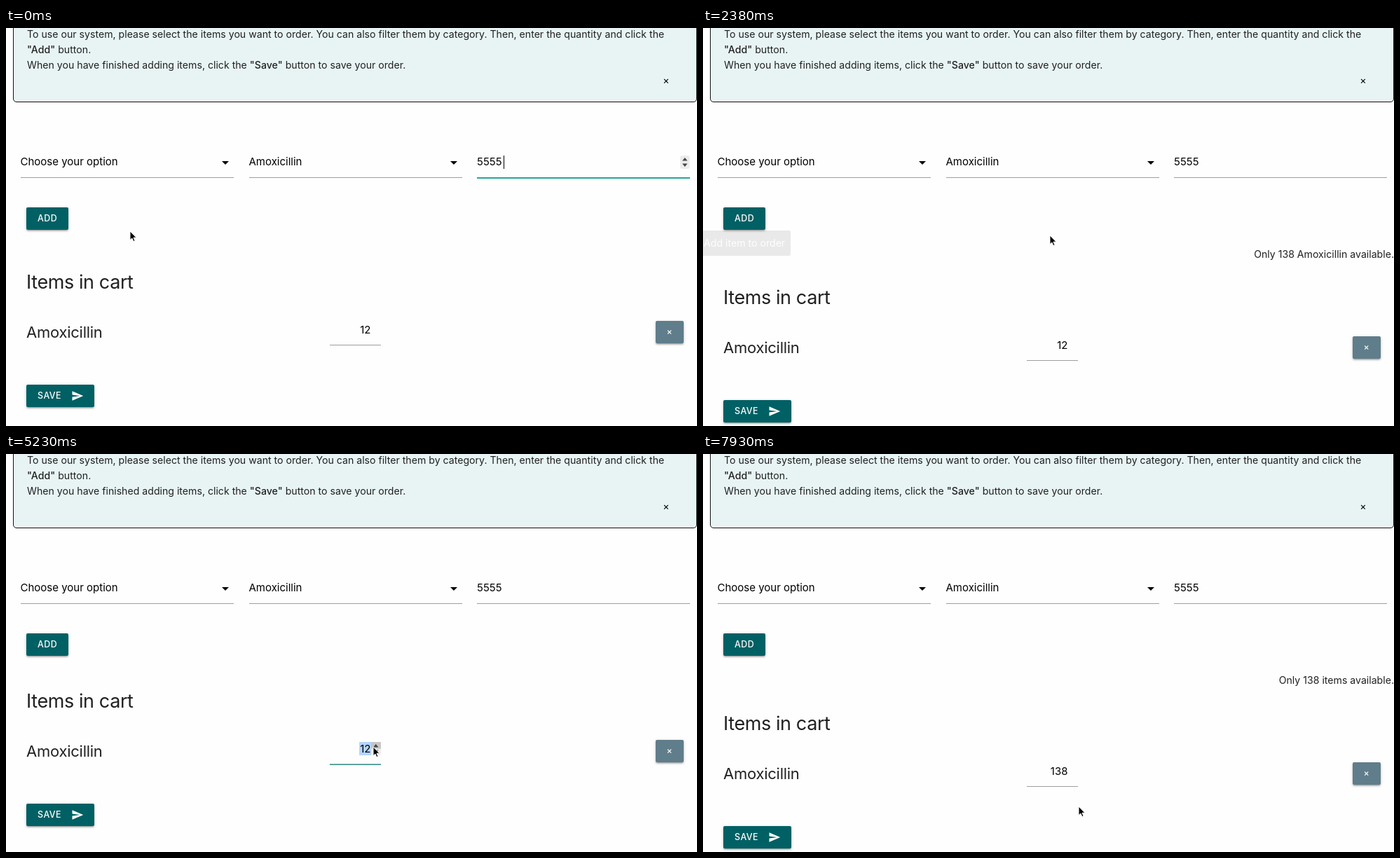
Write an HTML page that moves like this. It is 986 px wide and 568 px high and loops after 8000 ms.

```html
<!DOCTYPE html>
<html lang="en">
<head>
<meta charset="utf-8">
<title>Order form</title>
<style>
  html, body { margin: 0; width: 100%; height: 100%; overflow: hidden; background: #fefefe; }
  #stage { position: relative; width: 986px; height: 568px; overflow: hidden;
    font: 14.14px/20px Inter, sans-serif; font-optical-sizing: none; color: #212121; }
  #stage div, svg { position: absolute; white-space: pre; box-sizing: border-box; }
  b { font-weight: 500; }
  .field { top: 181px; width: 304px; height: 33px; border-bottom: 1px solid #9e9e9e; }
  .input { font-size: 15px; color: #000; }
  #stage .focus { border-color: #26a69a; box-shadow: 0 1px #26a69a; }
  .arrow { left: 287px; top: 9px; border: 5px solid transparent; border-top-color: #000; border-bottom: 0; }
  .caret { width: 1px; height: 19px; background: #000; }
  .btn { height: 32px; line-height: 32px; border-radius: 2px; background: #006064; color: #fff;
    font-size: 12.4px; font-weight: 500; letter-spacing: .5px;
    box-shadow: 0 2px 2px rgba(0,0,0,.14), 0 3px 1px -2px rgba(0,0,0,.12), 0 1px 4px rgba(0,0,0,.2); }
  #cart { left: 0; top: 0; width: 986px; height: 600px; }
</style>
</head>
<body>
<div id="stage">
  <div style="left:10px;top:-20px;width:976px;height:126px;border:1px solid #111;border-radius:5px;background:#e8f4f4"></div>
  <div style="left:30px;top:-2px;line-height:22.2px">To use our system, please select the items you want to order. You can also filter them by category. Then, enter the quantity and click the
<b>"Add"</b> button.
When you have finished adding items, click the <b>"Save"</b> button to save your order.</div>
  <div style="left:932px;top:65px;width:20px;text-align:center;color:#000">×</div>

  <div class="field input" style="left:20.5px">Choose your option<div class="arrow"></div></div>
  <div class="field input" style="left:346.5px">Amoxicillin<div class="arrow"></div></div>
  <div class="field input" id="quantity" style="left:672px">5555</div>
  <div class="caret" id="quantityCaret" style="left:710px;top:182px"></div>
  <svg id="quantitySpin" style="left:962px;top:182px" width="14" height="19">
    <rect width="13.5" height="19" rx="3" fill="#ececec"/>
    <path d="M3 7.5l3.7-4.5 3.7 4.5zM3 11.5l3.7 4.5 3.7-4.5z" fill="#444"/>
  </svg>

  <div class="btn" id="add" style="left:29px;top:255.5px;width:60px;padding-left:16px">ADD</div>
  <div id="message" style="right:0;top:313px"></div>

  <div id="cart">
    <div style="left:29px;top:343px;line-height:40px;font-size:27px;letter-spacing:-.41px">Items in cart</div>
    <div style="left:29px;top:414px;line-height:40px;font-size:22px;letter-spacing:-.25px">Amoxicillin</div>
    <div id="selection" style="left:504px;top:421px;width:17px;height:19px;background:#b4d5fe"></div>
    <div class="input" id="amount" style="left:462px;top:421px;width:73px;height:32px;padding-right:14.5px;text-align:right;border-bottom:1px solid #9e9e9e"></div>
    <div class="caret" id="amountCaret" style="left:520px;top:421px"></div>
    <svg id="amountSpin" style="left:521px;top:421px" width="14" height="19">
      <rect width="14" height="19" rx="3" fill="#ececec"/>
      <rect id="spinHover" width="14" height="9.5" fill="#c6c6c6"/>
      <path d="M3 7.5l3.7-4.5 3.7 4.5zM3 11.5l3.7 4.5 3.7-4.5z" fill="#444"/>
    </svg>
    <div class="btn" style="left:927px;top:418px;width:40px;background:#607d8b;text-align:center">×</div>
    <div class="btn" style="left:29px;top:509px;width:97px;padding-left:16px">SAVE<svg style="left:63.8px;top:7px" width="18" height="18" viewBox="0 0 24 24"><path fill="#fff" d="M2 21l21-9L2 3v7l15 2-15 2z"/></svg></div>
  </div>

  <div id="tooltip" style="left:-4px;width:129px;height:36px;padding-left:5px;line-height:36px;border-radius:2px;background:#323232;color:#fff">Add item to order</div>

  <svg id="cursor" style="left:-12px;top:-12px" width="36" height="36" viewBox="-12 -12 36 36">
    <path id="arrow" d="M0 0V12.6L2.9 10 4.9 14.6 7 13.7 5 9.2H9z" fill="#000" stroke="#fff"/>
    <path id="hand" transform="scale(1.1)" d="M-.8 8V.8C-.8-.5 1.3-.5 1.3.8V5C2 4.2 3.5 4.5 3.6 5.5 4.4 4.8 5.8 5 6 6.2 7 5.6 8.2 6.2 8.2 7.4 8.3 10.5 7.4 11.5 7 14H.8C.3 12-2.8 9.5-3.2 7.8-3 6.5-1.6 6.9-.8 8zM2.3 9v3M4.3 9v3M6 9v3" fill="#fff" stroke="#000"/>
    <path id="beam" d="M-3-7Q0-7 0-5V5Q0 7-3 7M3-7Q0-7 0-5V5Q0 7 3 7M-1.5 2.5h3" fill="none" stroke="#111" stroke-width="1.2"/>
  </svg>
</div>
<script>
const $ = id => document.getElementById(id);
const LOOP = 8000;

// time, x, y of the pointer's hot spot
const pointerPath = [
  [0, 177, 290], [150, 177, 290], [450, 155, 294], [750, 84, 284], [900, 71, 279],
  [1940, 71, 279], [2090, 150, 285], [2240, 340, 293], [2380, 495, 296],
  [2530, 550, 282], [2830, 700, 228], [3130, 783, 206], [3280, 783, 209],
  [3430, 598, 297], [3580, 560, 335], [3730, 530, 385], [3880, 514, 417],
  [4330, 510, 421], [4480, 523, 422], [4630, 524, 421], [4780, 524, 421],
  [5230, 524, 418], [5380, 524, 418], [5830, 534, 478], [6130, 536, 496],
  [6430, 536, 496], [6580, 536, 503], [LOOP, 536, 503]
];

const between = (t, from, to) => t >= from && t < to;
const progress = (t, from, to) => Math.min(1, Math.max(0, (t - from) / (to - from)));
const swing = p => .5 - Math.cos(p * Math.PI) / 2;
const show = (id, on) => { $(id).style.display = on ? '' : 'none'; };

// The screen refreshes about every 150 ms.
function snap(t) {
  const lag = t < 1040 ? 0 : t < 2380 ? 10 : 20;
  return Math.floor((t + lag) / 150) * 150 - lag;
}

function pointerAt(t) {
  const i = pointerPath.findIndex(point => point[0] > t);
  const [t0, x0, y0] = pointerPath[i - 1], [t1, x1, y1] = pointerPath[i];
  const p = (t - t0) / (t1 - t0);
  return [x0 + (x1 - x0) * p, y0 + (y1 - y0) * p];
}

function drawPointer(t) {
  const [x, y] = pointerAt(t);
  const hand = between(t, 750, 2090);
  const beam = between(t, 3130, 3430) || between(t, 3880, 4480);
  $('cursor').style.transform = `translate(${x}px, ${y}px)`;
  show('hand', hand);
  show('beam', beam);
  show('arrow', !hand && !beam);
}

function drawForm(t) {
  $('quantity').classList.toggle('focus', t < 900);
  show('quantityCaret', t < 450);
  show('quantitySpin', t < 900 || between(t, 3130, 3430));
  $('add').style.background = between(t, 750, 2090) ? '#3a8184' : '#006064';

  const tip = t < 2000 ? progress(t, 1260, 1520) : 1 - progress(t, 2150, 2405);
  $('tooltip').style.opacity = tip;
  $('tooltip').style.top = Math.round(288 + 9 * tip) + 'px';
}

function drawMessage(t) {
  const second = t >= 7330;
  $('message').textContent = `Only 138 ${second ? 'items' : 'Amoxicillin'} available.`;
  $('message').style.opacity = second
    ? swing(progress(t, 7330, 7730))
    : swing(progress(t, 1490, 1890)) * (1 - swing(progress(t, 2950, 3350)));
}

function drawCart(t) {
  const shift = t < 1490 ? 0 : between(t, 3430, 7330) ? -10 : 22;
  $('cart').style.transform = `translateY(${shift}px)`;

  const typed = Math.min(4, Math.floor((t - 5830) / 150));
  $('amount').textContent = t >= 7330 ? '138' : typed > 0 ? '4'.repeat(typed) : '12';
  $('amount').classList.toggle('focus', between(t, 4030, 6880));
  show('selection', t >= 4330 && typed < 1);
  show('amountCaret', between(t, 4030, 4330) || (typed > 0 && t < 6880));
  show('amountSpin', between(t, 3880, 6880));
  show('spinHover', between(t, 4480, 5530));
  $('spinHover').setAttribute('y', t < 4930 ? 9.5 : 0);
}

function frame(now) {
  const t = snap(now % LOOP);
  drawForm(t);
  drawMessage(t);
  drawCart(t);
  drawPointer(t);
  requestAnimationFrame(frame);
}
requestAnimationFrame(frame);
</script>
</body>
</html>
```
